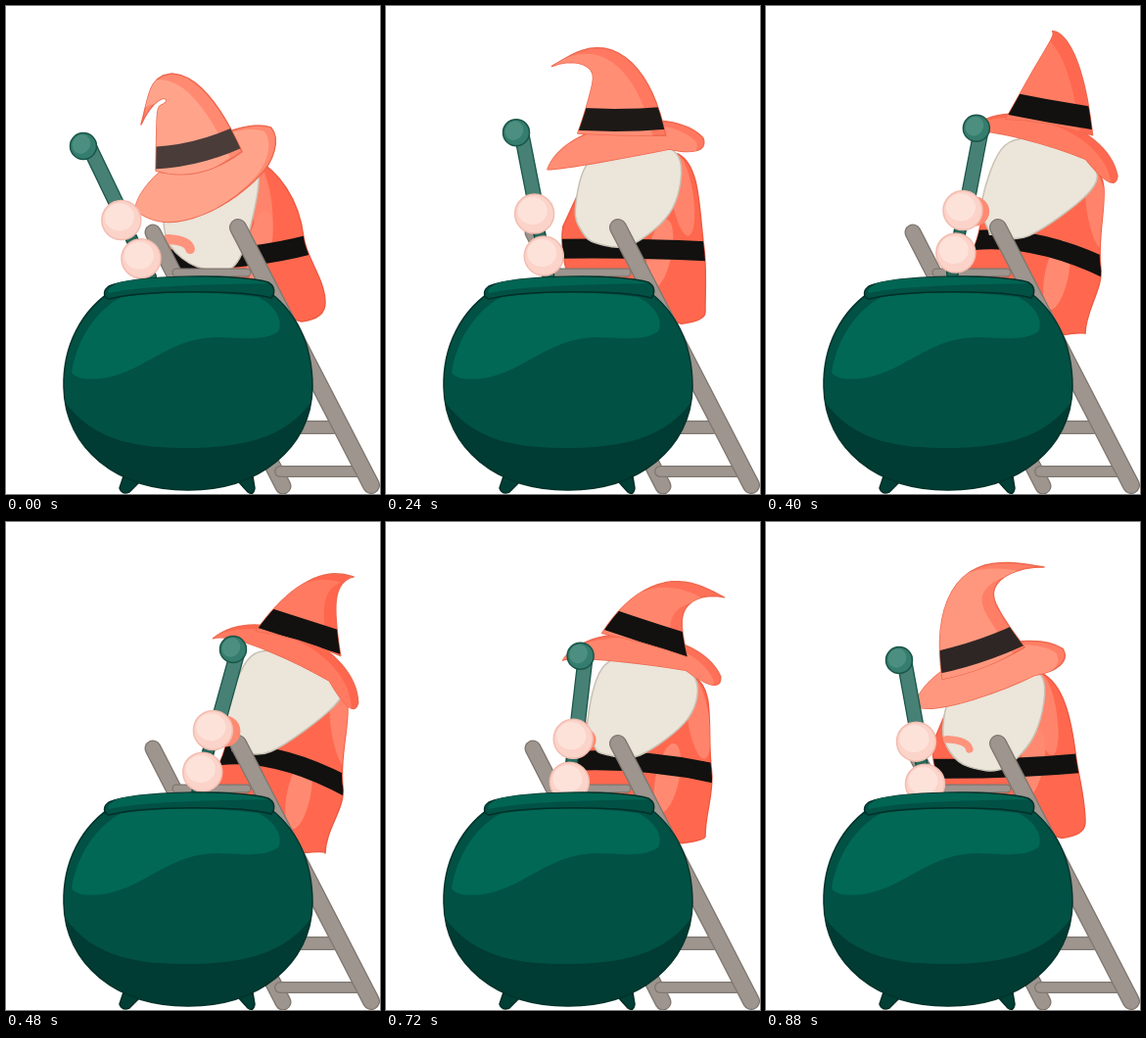
Write an HTML page with a canvas that moves like this. It is 382 px wide and 498 px high and loops after 0.96 s.

```html
<!DOCTYPE html>
<html lang="en">
<head>
<meta charset="utf-8">
<title>Stirring gnome</title>
<style>
html, body { margin: 0; width: 100%; height: 100%; overflow: hidden; background: #fff; }
canvas { display: block; width: 382px; height: 498px; }
</style>
</head>
<body>
<canvas id="stage" width="382" height="498"></canvas>
<script>
const ctx = document.getElementById('stage').getContext('2d');
const STEP = 80, STEPS = 12;

// Key joints at steps 0, 2, 4, 6, 8, 10 and 11. Everything else follows from them.
// hat centre x, y, tilt | cone bend x, y | cone tip x, y | spoon knob x, y
const KEYS = [
  [202,167,-30, 169,32, 138,121,  79,143],
  [220,153,-23, 204,39, 137,118,  87,138],
  [269,153,  4, 283,16, 219, 11, 184,122],
  [285,153, 25, 319,54, 355, 56, 232,130],
  [278,151, 18, 314,66, 347, 72, 219,134],
  [243,152, -5, 246,40, 338, 76, 175,139],
  [228,160,-20, 181,37, 284, 46, 136,141]
];

// Cubic through four neighbouring keys, wrapping round the loop
function pose(step) {
  const pos = step > 10 ? step - 5 : step / 2;
  const k = Math.floor(pos), u = pos - k;
  const at = i => KEYS[(i + KEYS.length) % KEYS.length];
  return KEYS[k].map((b, i) => {
    const a = at(k - 1)[i], c = at(k + 1)[i], d = at(k + 2)[i];
    return b + u / 2 * (c - a + u * (2 * a - 5 * b + 4 * c - d + u * (3 * (b - c) + d - a)));
  });
}

const mix = (a, b, u) => a + (b - a) * u;
const blend = (a, b, u) => `rgb(${a.map((v, i) => Math.round(mix(v, b[i], u)))})`;

// Closed smooth curve through points
function smooth(pts) {
  const n = pts.length, path = new Path2D(), pt = i => pts[(i + n) % n];
  path.moveTo(...pt(0));
  for (let i = 0; i < n; i++) {
    const [a, b, c, d] = [pt(i - 1), pt(i), pt(i + 1), pt(i + 2)];
    path.bezierCurveTo(b[0] + (c[0] - a[0]) / 6, b[1] + (c[1] - a[1]) / 6,
      c[0] - (d[0] - b[0]) / 6, c[1] - (d[1] - b[1]) / 6, ...c);
  }
  return path;
}

function paint(path, fill, line, width = 1.5) {
  if (fill) { ctx.fillStyle = fill; ctx.fill(path); }
  if (line) { ctx.strokeStyle = line; ctx.lineWidth = width; ctx.stroke(path); }
}

function disc(x, y, rx, ry, fill, line, turn = 0) {
  const p = new Path2D();
  p.ellipse(x, y, rx, ry, turn, 0, Math.PI * 2);
  paint(p, fill, line);
}

function inside(path, draw) {
  ctx.save();
  ctx.clip(path);
  draw();
  ctx.restore();
}

// Fill with a lighter, shifted copy on top
function shaded(path, base, light, dx, dy) {
  paint(path, base, '#ee6a51');
  inside(path, () => {
    ctx.translate(dx, dy);
    paint(path, light);
  });
}

function bar(x1, y1, x2, y2, width, fill, line) {
  const p = new Path2D();
  p.moveTo(x1, y1);
  p.lineTo(x2, y2);
  paint(p, null, line, width);
  paint(p, null, fill, width - 2.5);
}

function arc(x1, y1, cx, cy, x2, y2, color, width) {
  const p = new Path2D();
  p.moveTo(x1, y1);
  p.quadraticCurveTo(cx, cy, x2, y2);
  paint(p, null, color, width);
}

// lean runs from 0 (over the pot) to 1 (furthest back)
function drawBody(cx, cy, tilt, lean) {
  const bow = lean * lean;
  const sx = cx + 54, sy = cy + 4 + 28 * Math.sin(tilt);
  const mx = 304 + 40 * lean, my = 236 + 34 * bow;
  const corner = 303 + 35 * bow, hem = 322 + 16 * lean * bow;
  const waist = 165 + 60 * bow;
  const coat = new Path2D();
  coat.moveTo(cx - 30, cy);
  coat.lineTo(sx, sy);
  coat.bezierCurveTo(sx + 22, sy + 12, mx - 5, my - 40, mx, my);
  coat.bezierCurveTo(mx + 3, my + 22, 326, corner - 24, 326, corner);
  coat.quadraticCurveTo(326, hem - 3, 302, hem);
  coat.lineTo(190, 290);
  coat.quadraticCurveTo(waist - 4, 250, waist, 225);
  coat.closePath();
  paint(coat, '#ff684e', '#ee5b43');
  inside(coat, () => {
    disc(sx + 4, sy + 42, 11, 42, '#ff846b', null, -.15);
    disc(mx - 45, my + 8, 12, 36, '#ff8a71', null, .2);
    arc(waist - 6, 258 - 20 * lean, mx - 65, 262 - 30 * lean, mx + 8, 243 + 29 * bow, '#121110', 20);
  });
}

function drawBeard(cx, cy, tilt, lean) {
  const left = 161 + 63 * lean, chin = 270 - 60 * lean + 27 * lean * lean;
  const chinX = 213 + 40 * lean;
  paint(smooth([
    [cx - 38 * Math.cos(tilt), cy - 38 * Math.sin(tilt)],
    [left, 216 - 18 * lean],
    [left + 7, chin - 25 + 18 * lean],
    [chinX - 18, chin - 4],
    [chinX + 18, chin - 3],
    [cx + 48, 224 - 34 * lean],
    [cx + 54, cy + 5 + 20 * Math.sin(tilt)],
    [cx + 10, cy - 15]
  ]), '#ebe5da', '#c9c1b3');
  if (lean < .5) arc(left + 4, chin - 32, left + 25, chin - 31, left + 27, chin - 22, '#ff947d', 10 - 8 * lean);
}

function drawHat(cx, cy, tilt, lean, bend, tip) {
  const dip = 38 - 90 * lean + 40 * lean * lean, rise = 24 + 16 * lean;
  const base = blend([255, 138, 113], [255, 102, 78], lean);
  const light = blend([255, 164, 139], [255, 122, 96], lean);

  const local = new Path2D(), brim = new Path2D();
  local.moveTo(-81, 0);
  local.bezierCurveTo(-55, -rise * 1.35, 55, -rise * 1.35, 81, -3);
  local.bezierCurveTo(84, 12, 66, 10 + dip * .5, 45, dip * .9);
  local.bezierCurveTo(15, dip * 1.15, -65, dip * 1.3, -81, 0);
  brim.addPath(local, new DOMMatrix([Math.cos(tilt), Math.sin(tilt), -Math.sin(tilt), Math.cos(tilt), cx, cy]));
  shaded(brim, base, light, -7, 4);

  // Tapered cone along a quadratic spine
  const foot = 10 + 22 * lean;
  const root = [cx + foot * Math.sin(tilt), cy - foot * Math.cos(tilt)];
  const edge = (u, side) => {
    const v = 1 - u;
    const [x, y] = [0, 1].map(i => v * v * root[i] + 2 * u * v * bend[i] + u * u * tip[i]);
    const [dx, dy] = [0, 1].map(i => v * (bend[i] - root[i]) + u * (tip[i] - bend[i]));
    const w = side * 45 * v ** 1.3 / Math.hypot(dx, dy);
    return [x - dy * w, y + dx * w];
  };
  const cone = new Path2D();
  cone.moveTo(...edge(0, -1));
  for (let u = .05; u < 1; u += .05) cone.lineTo(...edge(u, -1));
  for (let u = 1; u > -.01; u -= .05) cone.lineTo(...edge(Math.max(0, u), 1));
  cone.quadraticCurveTo(root[0], root[1] + dip * .6, ...edge(0, -1));
  shaded(cone, base, light, -12, 6);

  const a = edge(.05, -1), b = edge(.05, 1);
  inside(cone, () => {
    arc(2 * a[0] - root[0], 2 * a[1] - root[1], root[0], root[1] - 10 + dip * .4,
      2 * b[0] - root[0], 2 * b[1] - root[1], blend([74, 60, 57], [18, 17, 16], Math.min(1, lean * 1.6)), 23);
  });
}

function drawLadder() {
  const wood = '#9d958e', edge = '#7f7770';
  bar(150, 231, 283, 490, 17, wood, edge);
  bar(174, 272, 246, 272, 9, wood, edge);
  bar(290, 430, 334, 430, 14, wood, edge);
  bar(280, 475, 360, 475, 12, wood, edge);
  bar(237, 226, 373, 489, 18, wood, edge);
}

// The spoon swings in proportion to how far its knob is from the pot's middle.
function drawSpoon(x, y, lean) {
  const turn = (x - 180) * .0047;
  const along = d => [x - d * Math.sin(turn), y + d * Math.cos(turn)];
  const hands = [along(85), along(129)];
  const [hx, hy] = hands[0];
  disc(hx + 12, hy + 1, 16 * lean, 16 * lean, '#ff8a72');
  ctx.save();
  ctx.translate(x, y);
  ctx.rotate(turn);
  bar(1, 80, 0, 150, 13, '#27695b', '#0e4a3e');
  bar(5, 5, 3, 80, 16, '#478074', '#195548');
  ctx.restore();
  disc(x, y, 13.5, 13.5, '#357d6e', '#195548');
  disc(x - 2, y - 2, 9, 10, '#4c8f80', null, .6);
  for (const [px, py] of hands) {
    disc(px, py, 20, 20, '#fbd3c9', '#f3bcb0');
    disc(px - 2, py - 3, 15, 14, '#fde2da');
  }
}

const pot = {
  feet: new Path2D('M120 480L116 492Q118 499 126 496L136 486ZM238 486L247 496Q253 500 254 492L252 480Z'),
  bowl: new Path2D('M112 288C76 310 58 348 59 389C60 452 114 494 186 494C257 494 312 452 313 389C313 348 298 312 264 288Z'),
  shine: new Path2D('M67 374C72 342 90 312 118 297Q190 288 257 297C275 305 284 322 278 332C264 343 236 338 215 338C170 339 148 366 112 377C92 383 72 382 67 374Z'),
  shade: new Path2D('M59 402C90 447 140 451 185 451C240 451 287 441 313 402V496H59Z'),
  lip: new Path2D('M105 286C132 274 242 273 268 282C275 286 275 293 271 298C238 289 140 290 105 299C99 297 99 290 105 286Z'),
  top: new Path2D('M113 283C140 275 238 274 268 283C240 284 145 284 105 293Q102 289 113 283Z')
};

function drawPot() {
  paint(pot.feet, '#003f35', '#002b24');
  paint(pot.bowl, '#015145');
  inside(pot.bowl, () => {
    paint(pot.shade, '#003c33');
    paint(pot.shine, '#016855');
  });
  paint(pot.bowl, null, '#00332b');
  paint(pot.lip, '#015145', '#002f28');
  paint(pot.top, '#016553');
}

function draw(step) {
  const [cx, cy, deg, bx, by, tx, ty, kx, ky] = pose(step);
  const tilt = deg * Math.PI / 180;
  const lean = Math.min(1.05, Math.max(0, (cx - 202) / 83));
  ctx.fillStyle = '#fff';
  ctx.fillRect(0, 0, 382, 498);
  ctx.lineCap = ctx.lineJoin = 'round';
  drawBody(cx, cy, tilt, lean);
  drawBeard(cx, cy, tilt, lean);
  drawHat(cx, cy, tilt, lean, [bx, by], [tx, ty]);
  drawLadder();
  drawSpoon(kx, ky, lean);
  drawPot();
}

const start = performance.now();
function tick() {
  const t = Math.max(0, performance.now() - start);
  draw(Math.floor(t / STEP) % STEPS);
  requestAnimationFrame(tick);
}
tick();
</script>
</body>
</html>
```
